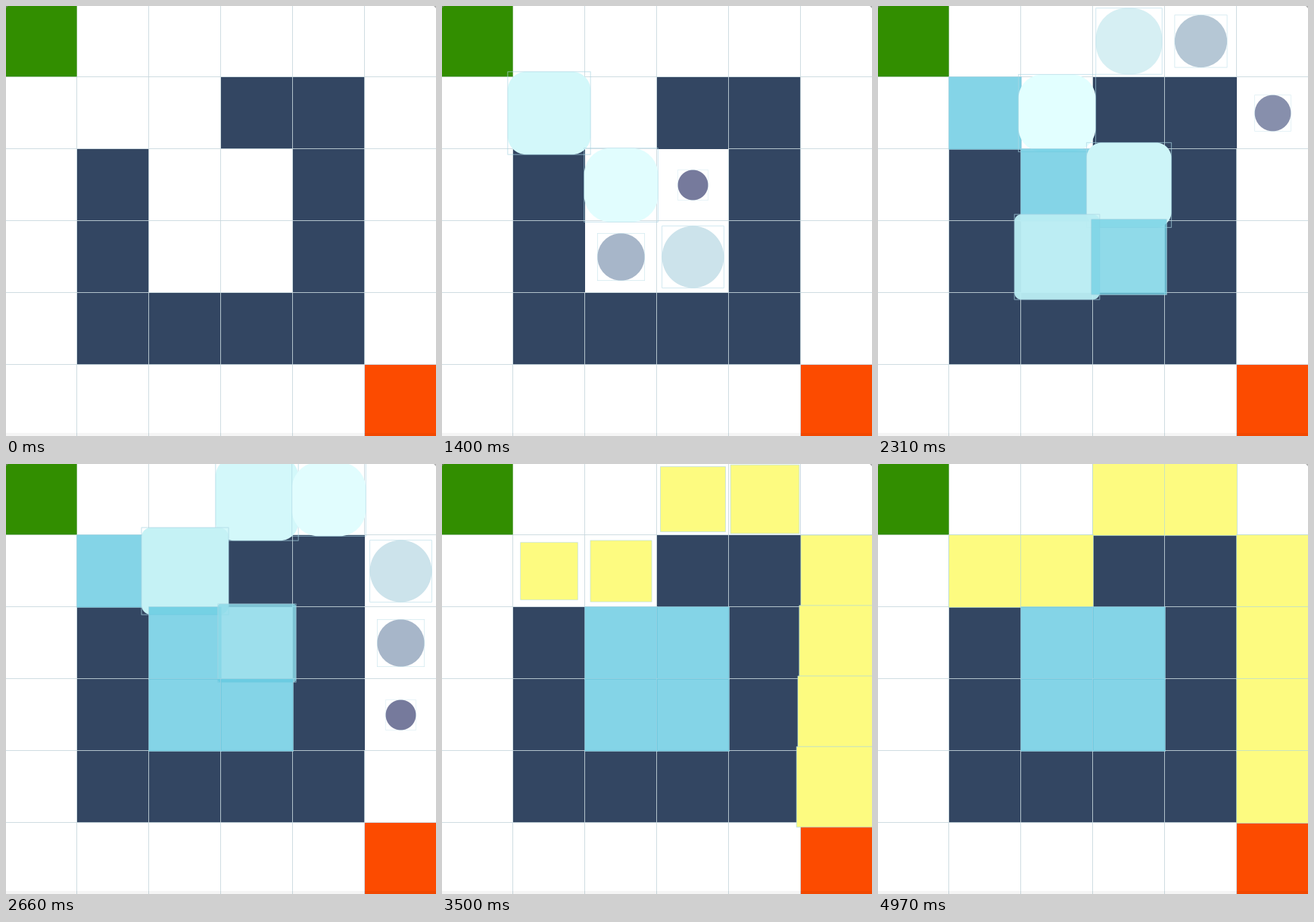
Write a matplotlib script that moves like this. It is 568x568 px and loops after 5110 ms.

```python
import numpy as np
import matplotlib.pyplot as plt
from matplotlib.animation import FuncAnimation
from matplotlib.patches import PathPatch, Polygon, Rectangle
from matplotlib.path import Path

STAGE, PITCH, CELL, GRID = 568, 95, 96, 6
DPI = 71
PX = 72 / DPI
FRAMES, INTERVAL = 73, 70

# Times below are in animation steps
VISIT_START, VISIT_GAP = 6.65, 3
PATH_START, PATH_GAP = 42.45, 0.75
DURATION = 22.5

# Keyframes: position, values
GROW = [(0, 0.3), (0.75, 1.2), (1, 1.0)]
POP = [(0, 0.6), (0.5, 1.2), (1, 1.0)]
ROUND = [(0, 1.0), (1, 0.0)]
TINT = [(0, (92, 90, 133, 1)), (0.5, (227, 255, 255, 1)),
        (0.75, (197, 242, 245, 1)), (1, (132, 212, 231, 0.75))]


def rgb(r, g, b):
    return r / 255, g / 255, b / 255


NAVY, YELLOW = rgb(51, 70, 98), rgb(253, 251, 128)
LINE, EDGE = rgb(200, 216, 221), rgb(170, 214, 228)


def is_wall(col, row):
    """A ring around the centre, open at its upper left."""
    mid = (GRID - 1) / 2
    on_ring = max(abs(col - mid), abs(row - mid)) == 1.5
    return on_ring and not (row == 1 and col < 3)


def search(start, goal):
    """Greedy best-first search; returns the visit order and the way back."""
    def rank(node):
        return (goal[0] - node[0]) ** 2 + (goal[1] - node[1]) ** 2, node

    parent, queue, visited = {start: None}, [start], []
    while queue:
        node = min(queue, key=rank)
        if node == goal:
            break
        queue.remove(node)
        visited.append(node)
        for dc, dr in np.ndindex(3, 3):
            step = col, row = node[0] + dc - 1, node[1] + dr - 1
            inside = 0 <= min(step) and max(step) < GRID
            if inside and step not in parent and not is_wall(col, row):
                parent[step] = node
                queue.append(step)
    back, node = [], parent[goal]
    while node != start:
        back.append(node)
        node = parent[node]
    return visited[1:], back


def ease_out(x):
    """cubic-bezier(0, 0, .58, 1)"""
    lo, hi = 0.0, 1.0
    for _ in range(30):
        t = (lo + hi) / 2
        if 1.74 * t * t * (1 - t) + t ** 3 < x:
            lo = t
        else:
            hi = t
    return 3 * t * t * (1 - t) + t ** 3


def tween(keys, p):
    if p >= 1:
        return np.array(keys[-1][1], float)
    for (p0, a), (p1, b) in zip(keys, keys[1:]):
        if p < p1:
            a, b = np.array(a, float), np.array(b, float)
            return a + (b - a) * ease_out((p - p0) / (p1 - p0))


def tint(p):
    """Fill that shows the keyframed colour when laid over white."""
    *seen, alpha = tween(TINT, p)
    pure = (np.array(seen) / 255 - (1 - alpha)) / alpha
    return (*np.clip(pure, 0, 1), alpha)


def rounded(cx, cy, half, radius):
    r = min(radius, half)
    k = r * 0.4477
    verts, codes = [], []
    for sx, sy in [(1, 1), (-1, 1), (-1, -1), (1, -1)]:
        x, y = cx + sx * half, cy + sy * half
        side = [(x, y - sy * r), (x, y - sy * k),
                (x - sx * k, y), (x - sx * r, y)]
        verts += side if sx == sy else side[::-1]
        codes += [Path.LINETO] + [Path.CURVE4] * 3
    codes[0] = Path.MOVETO
    return Path(verts + [verts[0]], codes + [Path.CLOSEPOLY])


fig = plt.figure(figsize=(STAGE / DPI, STAGE / DPI), dpi=DPI, facecolor="white")
ax = fig.add_axes([0, 0, 1, 1])
ax.set_xlim(0, STAGE)
ax.set_ylim(STAGE, 0)
ax.axis("off")


def block(x, y, w, h, color, z=0, alpha=1):
    return ax.add_patch(Rectangle((x, y), w, h, fc=color, lw=0, alpha=alpha,
                                  zorder=z, snap=False))


def draw_board():
    block(0, 0, 93.6, 93.3, rgb(50, 142, 0), 2)
    block(474, 474, 94, 94, rgb(252, 75, 0))
    for col, row in np.ndindex(GRID, GRID):
        if is_wall(col, row):
            block(col * PITCH - 1, row * PITCH - 1, PITCH, PITCH, NAVY)
    for pos in np.arange(1, GRID) * PITCH - 2:
        block(pos, 0, 1, STAGE, LINE, 1, 0.85)
        block(0, pos, STAGE, 1, LINE, 1, 0.85)
    block(0, 564, STAGE, 4, "black", 1, 0.04)
    for x, dx in [(0, 3), (STAGE, -3)]:
        ax.add_patch(Polygon([(x, 0), (x + dx, 0), (x, 3)], fc="0.5",
                             lw=0, alpha=0.6, zorder=90))


class Cell:
    def __init__(self, col, row, visit, route):
        self.cx, self.cy = 46.5 + col * PITCH, 46.5 + row * PITCH
        self.visit = VISIT_START + VISIT_GAP * visit
        self.route = np.inf
        if (col, row) in route:
            self.route = PATH_START + PATH_GAP * route.index((col, row))
        z = 10 + row * GRID + col
        self.fill = PathPatch(rounded(0, 0, 1, 0), lw=0, zorder=z, snap=False)
        self.edge = Rectangle((0, 0), 1, 1, fill=False, zorder=z + 0.5,
                              ec=(*EDGE, 0.6), snap=False)
        self.parts = [ax.add_patch(self.fill), ax.add_patch(self.edge)]
        # A wall to the left or above swallows the shared grid line
        x, y = col * PITCH - 2, row * PITCH - 2
        if is_wall(col - 1, row):
            self.parts.append(block(x, y + 1, 1, PITCH - 1, NAVY, 2))
        if is_wall(col, row - 1):
            self.parts.append(block(x + 1, y, PITCH - 1, 1, NAVY, 2))

    def update(self, step):
        shown = step >= self.visit
        for part in self.parts:
            part.set_visible(shown)
        if not shown:
            return
        if step >= self.route:
            scale = tween(POP, (step - self.route) / DURATION)
            radius, color = 0, YELLOW
        else:
            p = (step - self.visit) / DURATION
            scale, radius, color = tween(GROW, p), tween(ROUND, p), tint(p)
        size = CELL * scale
        self.fill.set_path(rounded(self.cx, self.cy, size / 2, radius * size))
        self.fill.set_facecolor(color)
        self.edge.set_bounds(self.cx - size / 2, self.cy - size / 2, size, size)
        self.edge.set_linewidth(scale * PX)


draw_board()
visited, route = search((0, 0), (GRID - 1, GRID - 1))
cells = [Cell(*node, i, route) for i, node in enumerate(visited)]


def update(step):
    for cell in cells:
        cell.update(step)
    return []


anim = FuncAnimation(fig, update, frames=FRAMES, interval=INTERVAL,
                     repeat=True, repeat_delay=0, blit=False)
plt.show()
```
